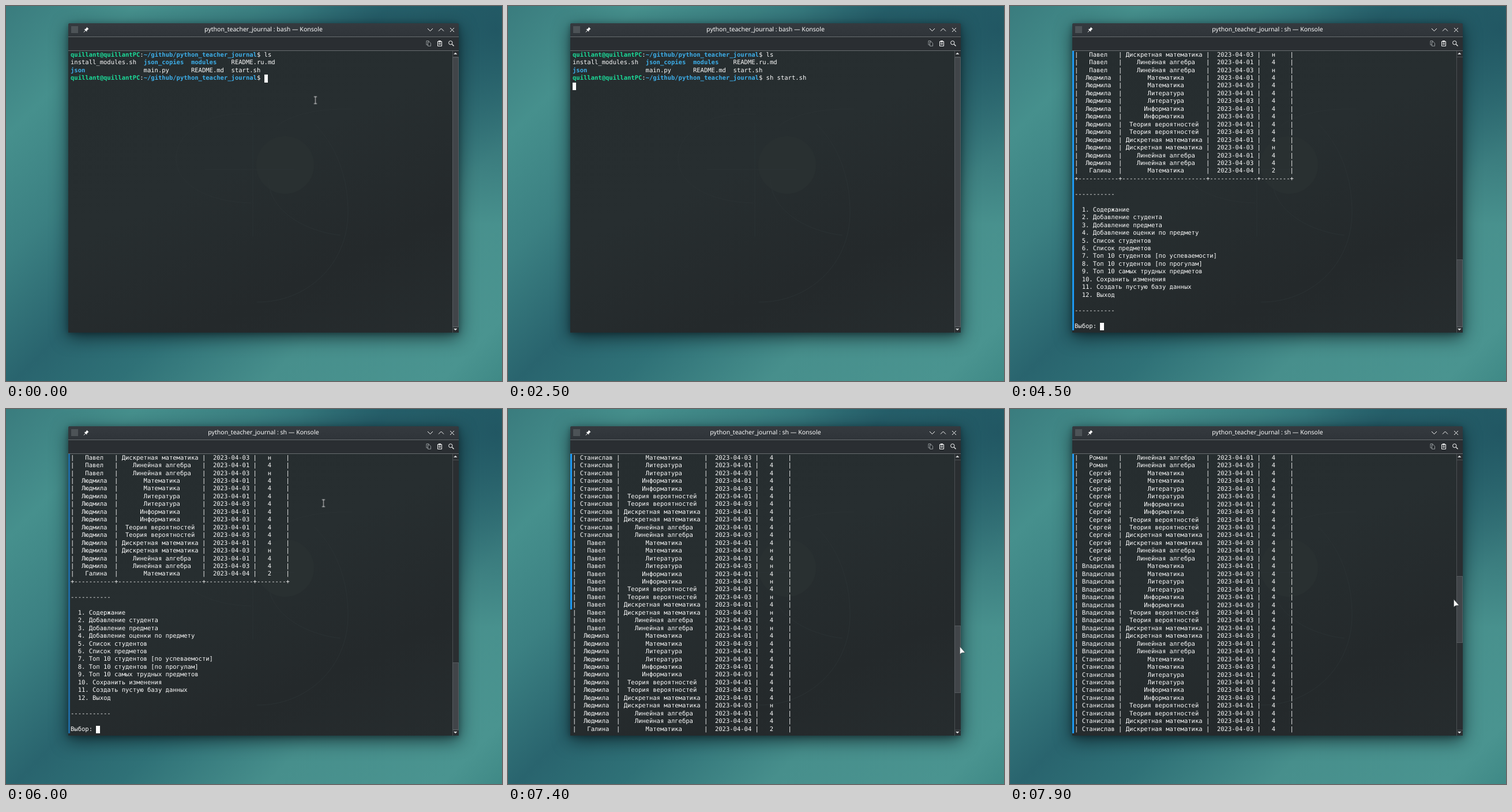
An HTML page that plays this animation: 860 by 651 pixels, repeating every 8000 ms.

```html
<!DOCTYPE html>
<html lang="ru">
<head>
<meta charset="utf-8">
<title>Konsole</title>
<style>
:root { --row: 13.4583px; --loop: 8s; }
html, body { margin: 0; width: 100%; height: 100%; overflow: hidden; }
body {
  position: relative;
  background:
    radial-gradient(circle at 850px 40px, rgba(31, 83, 96, .88), rgba(31, 83, 96, 0) 340px),
    linear-gradient(135deg, #3a7c7e, #46908d 15%, #3b8082 29%, #29646e 44%, #2f7177 56%, #478f8c 73%, #4a9490 93%, #3f8986);
}
div, pre, svg, .title { position: absolute; }
.window, .shadow { left: 108px; top: 30px; width: 677px; height: 537px; border-radius: 3px 3px 0 0; }
.window { overflow: hidden; background: linear-gradient(155deg, #262d2f, #272e30 45%, #24292b 75%, #262c2e); }
.shadow { box-shadow: 0 8px 30px rgba(8, 18, 24, .68), 0 2px 8px rgba(8, 18, 24, .35); }
.titlebar { width: 100%; height: 23px; background: linear-gradient(#353a3f, #2f3439); }
.toolbar { top: 23px; width: 100%; height: 23px; border: solid #686d70; border-width: 1px 0; background: #2a2e32; }
.title {
  left: 0; width: 100%; top: 0; text-align: center; color: #fcfcfc;
  font: 10.55px/23px "Noto Sans", sans-serif; text-rendering: geometricPrecision;
}
.scrollbar { left: 666px; top: 48px; width: 11px; height: 489px; background: #2a2e31; }
.thumb {
  left: 774px; top: 89px; width: 9px; height: 466px;
  background: #414549; border: 1px solid #565b5f;
  animation: thumb var(--loop) step-end infinite;
}
.screen, .screen pre {
  font: 10.52px/var(--row) "DejaVu Sans Mono", monospace;
  text-rendering: geometricPrecision; color: #fcfcfc;
}
.screen { left: 112px; top: 78.9px; width: 660px; height: calc(36 * var(--row)); overflow: hidden; }
.screen pre { margin: 0; left: 0; top: 0; white-space: pre; }
.screen b { color: #3daee9; }
.screen b.user { color: #1cdc9a; }
.typed { display: inline-block; vertical-align: top; overflow: hidden; height: var(--row); animation: typing var(--loop) step-end infinite; }
.choice { animation: choice var(--loop) step-end infinite; }
.early { animation: early var(--loop) step-end infinite; }
.late { animation: late var(--loop) step-end infinite; }
#menu { animation: menu var(--loop) step-end infinite; }
#log { animation: log var(--loop) step-end infinite; }
.cursor { width: 1ch; height: var(--row); background: #fcfcfc; animation: cursor var(--loop) step-end infinite; }
.marker { left: 108px; top: 78px; width: 3px; animation: marker var(--loop) step-end infinite; }
svg { left: 0; top: 0; }
.pointer { animation: pointer var(--loop) step-end infinite; }
.beam { animation: beam var(--loop) step-end infinite; }
.arrow { animation: arrow var(--loop) step-end infinite; }

@keyframes typing {
  0% { width: 0; } 3.75% { width: 2ch; } 7.5% { width: 3ch; } 10% { width: 4ch; }
  12.5% { width: 5ch; } 13.75% { width: 6ch; } 17.5%, 100% { width: 12ch; }
}
@keyframes cursor {
  0% { left: 53ch; top: calc(3 * var(--row)); }
  3.75% { left: 55ch; top: calc(3 * var(--row)); }
  7.5% { left: 56ch; top: calc(3 * var(--row)); }
  10% { left: 57ch; top: calc(3 * var(--row)); }
  12.5% { left: 58ch; top: calc(3 * var(--row)); }
  13.75% { left: 59ch; top: calc(3 * var(--row)); }
  17.5% { left: 65ch; top: calc(3 * var(--row)); }
  31.25% { left: 0; top: calc(4 * var(--row)); }
  47.5% { left: 7ch; top: calc(18 * var(--row)); }
  52.5% { left: 8ch; top: calc(18 * var(--row)); }
  56.25% { left: 7ch; top: calc(35 * var(--row)); }
  92.5%, 100% { left: 7ch; top: calc(55 * var(--row)); }
}
@keyframes early { 0% { visibility: visible; } 47.5%, 100% { visibility: hidden; } }
@keyframes late { 0% { visibility: hidden; } 47.5%, 100% { visibility: visible; } }
@keyframes menu { 0% { visibility: hidden; } 47.5% { visibility: visible; } 56.25%, 100% { visibility: hidden; } }
@keyframes choice { 0% { opacity: 0; } 52.5%, 100% { opacity: 1; } }
@keyframes log {
  0% { visibility: hidden; top: 0; }
  56.25% { visibility: visible; top: calc(-47 * var(--row)); }
  92.5% { visibility: visible; top: calc(-27 * var(--row)); }
  93.75% { visibility: visible; top: calc(-6 * var(--row)); }
  98.75%, 100% { visibility: visible; top: 0; }
}
@keyframes thumb {
  0% { top: 89px; height: 466px; }
  56.25% { top: 440px; height: 115px; }
  92.5% { top: 376px; height: 115px; }
  93.75% { top: 309px; height: 115px; }
  98.75%, 100% { top: 290px; height: 114px; }
}
@keyframes marker {
  0% { height: 0; background: #1d99f3; }
  56.25% { height: 485px; background: #1d99f3; }
  60% { height: 485px; background: #1f6aa2; }
  92.5% { height: 270px; background: #1d99f3; }
  93.75%, 100% { height: 485px; background: #1d99f3; }
}
@keyframes pointer {
  0% { transform: translate(536.5px, 163.5px); }
  75% { transform: translate(550.5px, 163.5px); }
  76.25% { transform: translate(585.5px, 212.5px); }
  77.5% { transform: translate(628.5px, 272.5px); }
  80% { transform: translate(715.5px, 398.5px); }
  81.25% { transform: translate(777px, 504px); }
  83.75% { transform: translate(788px, 499px); }
  85% { transform: translate(795px, 492px); }
  86.25% { transform: translate(784px, 484px); }
  90% { transform: translate(783px, 483px); }
  92.5% { transform: translate(783px, 412px); }
  93.75% { transform: translate(777px, 348px); }
  98.75%, 100% { transform: translate(769px, 330px); }
}
@keyframes beam {
  0% { visibility: visible; } 3.75% { visibility: hidden; }
  75% { visibility: visible; } 81.25%, 100% { visibility: hidden; }
}
@keyframes arrow { 0% { visibility: hidden; } 81.25%, 100% { visibility: visible; } }
</style>
</head>
<body>
<div class="shadow"></div>
<div class="window">
  <div class="titlebar"></div>
  <div class="toolbar"></div>
  <span class="title early">python_teacher_journal : bash — Konsole</span>
  <span class="title late">python_teacher_journal : sh — Konsole</span>
  <div class="scrollbar"></div>
</div>

<svg width="860" height="651" fill="none">
  <!-- faint backdrop -->
  <circle cx="484" cy="276" r="50" fill="#293031"/>
  <g stroke="#2b3234">
    <path d="M430 188C350 180 295 220 295 265S350 340 425 342M428 203V400M345 284H500"/>
    <path d="M470 208C500 186 545 178 600 179M535 205C580 250 593 310 593 358C593 450 520 515 435 514M455 300C455 350 510 390 580 398"/>
  </g>
  <!-- title bar -->
  <rect x="113" y="35" width="12" height="12" fill="#4d5357"/>
  <path d="M140 36.5l3.5 3.5-1.2.6-1.9 2-.2 2.2-4.7-4.7 2.2-.2 2-1.9z" fill="#fcfcfc"/>
  <path d="M138 42l-3 3.5M731 39l4.5 4.5 4.5-4.5M750 43.5l4.5-4.5 4.5 4.5M770 38l7 7m0-7l-7 7" stroke="#fcfcfc"/>
  <!-- toolbar -->
  <path d="M731.5 67.5H729v-7h4v2M731.5 62.5h3l2 2v5h-5z" stroke="#92979a"/>
  <path d="M748.5 61.5h7v8h-7zM750 64.5h4M750 66.5h4" stroke="#fcfcfc"/>
  <path d="M750 60h4v2.5h-4z" fill="#fcfcfc"/>
  <path d="M773.5 66.5l3 3" stroke="#fcfcfc" stroke-width="1.3"/>
  <circle cx="770.8" cy="63.8" r="3.2" stroke="#fcfcfc"/>
  <!-- scroll buttons -->
  <path d="M774.5 78V567M774 88.5h11M774 557.5h11" stroke="#4b5053"/>
  <path d="M776 84h6.5l-3.25-3.3zM776 560h6.5l-3.25 3.3z" fill="#d5d7d8"/>
</svg>

<div class="thumb"></div>
<div class="marker"></div>
<div class="screen">
  <pre class="early" id="shell"></pre>
  <pre id="menu"></pre>
  <pre id="log"></pre>
  <div class="cursor"></div>
</div>

<svg width="860" height="651" fill="none">
  <g class="pointer">
    <g class="beam">
      <path d="M0 -6V6" stroke="#15191b" stroke-width="3"/>
      <path d="M-2.5 -6H2.5M0 -6V6M-2.5 6H2.5" stroke="#f4f4f4"/>
    </g>
    <path class="arrow" d="M.5 .5V13.5L4 11.2L9.5 10.8Z" fill="#fcfcfc" stroke="#3a4245" stroke-width=".6"/>
  </g>
</svg>

<script>
const byId = id => document.getElementById(id);
const dir = name => `<b>${name}</b>`;
const prompt = `<b class="user">quillant@quillantPC</b>:${dir('~/github/python_teacher_journal')}$ `;

byId('shell').innerHTML = [
  prompt + 'ls',
  `install_modules.sh  ${dir('json_copies')}  ${dir('modules')}    README.ru.md`,
  `${dir('json')}                main.py      README.md  start.sh`,
  prompt + '<span class="typed">sh start.sh </span>'
].join('\n');

const rule = '-'.repeat(11);
const options = [
  'Содержание', 'Добавление студента', 'Добавление предмета',
  'Добавление оценки по предмету', 'Список студентов', 'Список предметов',
  'Топ 10 студентов [по успеваемости]', 'Топ 10 студентов [по прогулам]',
  'Топ 10 самых трудных предметов', 'Сохранить изменения',
  'Создать пустую базу данных', 'Выход'
].map((text, i) => `  ${i + 1}. ${text}`);
const menu = ['', rule, '', ...options, '', rule, '', 'Выбор: '];
byId('menu').innerHTML = menu.join('\n') + '<span class="choice">1</span>';

const widths = [11, 23, 13, 8];
// Odd leftover space goes left of even-length text, right of odd-length text.
function center(text, width) {
  const gap = (width - text.length) / 2;
  const left = text.length % 2 ? Math.floor(gap) : Math.ceil(gap);
  return (' '.repeat(left) + text).padEnd(width);
}
const tableRow = cells => `|${cells.map((cell, i) => center(cell, widths[i])).join('|')}|`;

const subjects = ['Математика', 'Литература', 'Информатика', 'Теория вероятностей', 'Дискретная математика', 'Линейная алгебра'];
const students = ['Роман', 'Сергей', 'Владислав', 'Станислав', 'Павел', 'Людмила'];
const isAbsent = (name, subject) => name === 'Павел' || (name === 'Людмила' && subject === subjects[4]);

const marks = students.flatMap(name => subjects.flatMap(subject => [
  [name, subject, '2023-04-01', '4'],
  [name, subject, '2023-04-03', isAbsent(name, subject) ? 'н' : '4']
])).slice(10);
marks.push(['Галина', subjects[0], '2023-04-04', '2']);

const border = `+${widths.map(width => '-'.repeat(width)).join('+')}+`;
byId('log').textContent = [...marks.map(tableRow), border, ...menu].join('\n');
</script>
</body>
</html>
```
